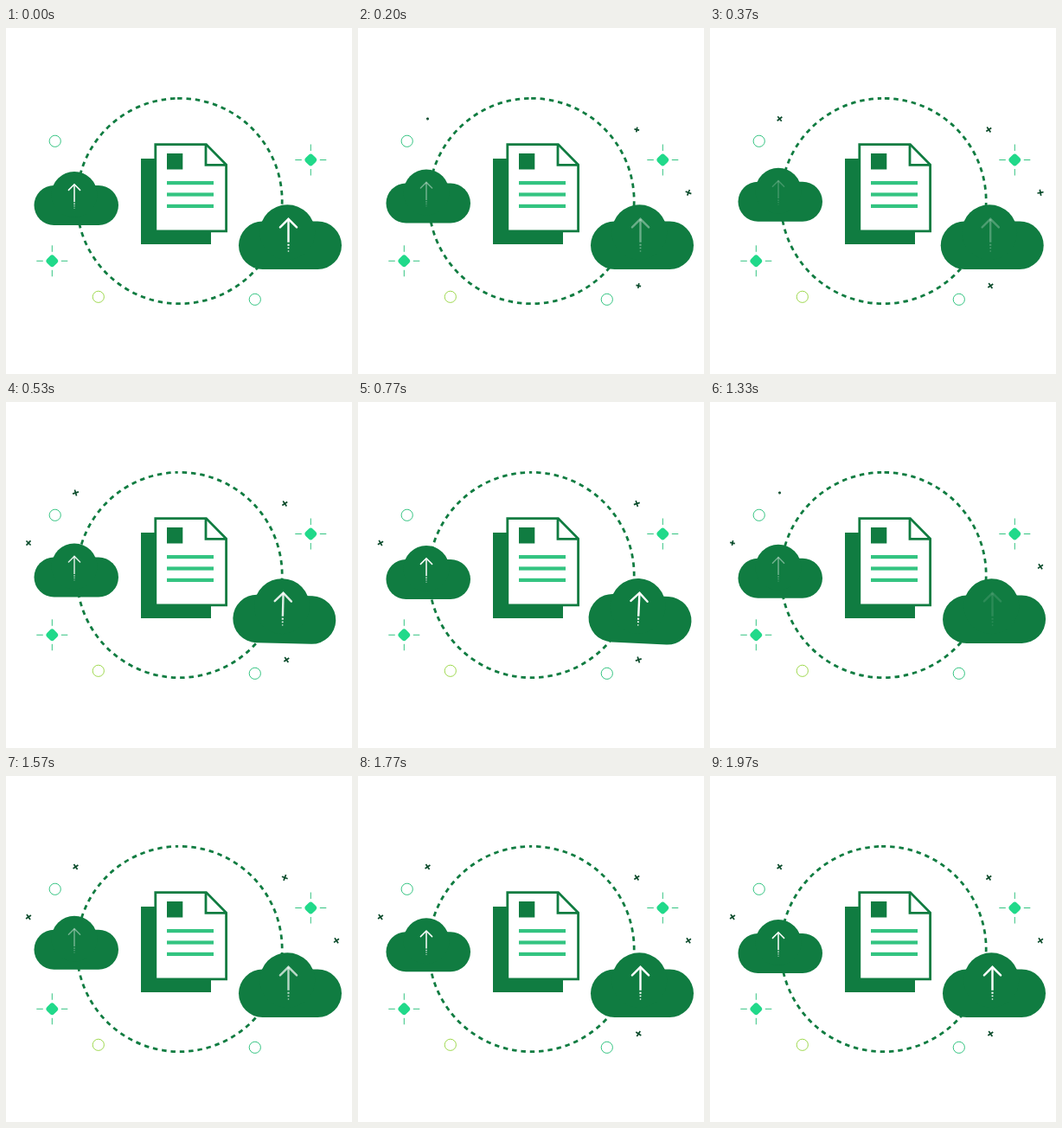
Recreate the animation shown at these times as an HTML page with a canvas. Size 400 px wide and 400 px high, loop 2.01 s.

```html
<!DOCTYPE html>
<html lang="en">
<head>
<meta charset="utf-8">
<title>Cloud upload</title>
<style>
  html, body { margin: 0; width: 100%; height: 100%; overflow: hidden; background: #fff; }
  canvas { display: block; width: 400px; height: 400px; }
</style>
</head>
<body>
<canvas id="stage"></canvas>
<script>
const LOOP = 2010, FRAMES = 60, FPS = 30;
const GREEN = '#107c41', MINT = '#33c481', BRIGHT = '#21d98a', DARK = '#0b4c2c';
const TAU = Math.PI * 2, RAD = Math.PI / 180;

const canvas = document.getElementById('stage');
const ctx = canvas.getContext('2d');
const ratio = window.devicePixelRatio || 1;
canvas.width = canvas.height = 400 * ratio;

const clamp = v => Math.max(0, Math.min(1, v));
const smooth = v => { v = clamp(v); return v * v * (3 - 2 * v); };

// Eased value through [frame, value] keys
function track(keys, f) {
  for (let i = 1; i < keys.length; i++) {
    const [f0, v0] = keys[i - 1], [f1, v1] = keys[i];
    if (f <= f1) return v0 + (v1 - v0) * smooth((f - f0) / (f1 - f0));
  }
  return keys[keys.length - 1][1];
}

// Linear dip from 1 to 0 and back around a middle frame
const dip = (f, mid, half) => clamp(Math.abs(f - mid) / half);

function bump(f, start, length) {
  const p = clamp((f - start) / length);
  return (1 - Math.cos(p * TAU)) / 2;
}

function stroke(color, width, ...lines) {
  ctx.strokeStyle = color;
  ctx.lineWidth = width;
  ctx.beginPath();
  for (const [x, y, ...rest] of lines) {
    ctx.moveTo(x, y);
    for (let i = 0; i < rest.length; i += 2) ctx.lineTo(rest[i], rest[i + 1]);
  }
  ctx.stroke();
}

function box(color, x, y, w, h) {
  ctx.fillStyle = color;
  ctx.fillRect(x, y, w, h);
}

function ring(x, y, color) {
  ctx.strokeStyle = color;
  ctx.lineWidth = 1;
  ctx.beginPath();
  ctx.arc(x, y, 6.6, 0, TAU);
  ctx.stroke();
}

function sparkle(x, y) {
  stroke(MINT, 1,
    [x - 18, y, x - 10.5, y], [x + 10.5, y, x + 18, y],
    [x, y - 18, x, y - 10.5], [x, y + 10.5, x, y + 18]);
  ctx.save();
  ctx.translate(x, y);
  ctx.rotate(45 * RAD);
  ctx.fillStyle = BRIGHT;
  ctx.beginPath();
  ctx.roundRect(-5.8, -5.8, 11.6, 11.6, 3.4);
  ctx.fill();
  ctx.restore();
}

function dashes(f) {
  const count = 72, step = TAU * 119 / count;
  ctx.save();
  ctx.setLineDash([step * 0.53, step * 0.47]);
  ctx.lineDashOffset = -2 * step * f / FRAMES;
  ctx.strokeStyle = GREEN;
  ctx.lineWidth = 2.8;
  ctx.beginPath();
  ctx.arc(200.5, 200, 118.7, -Math.PI / 2 - 0.02, 1.5 * Math.PI - 0.02);
  ctx.stroke();
  ctx.restore();
}

function page() {
  box(GREEN, 156, 151, 81, 99);
  ctx.beginPath();
  ctx.moveTo(172.8, 134.6);
  ctx.lineTo(231.5, 134.6);
  ctx.lineTo(254.6, 158);
  ctx.lineTo(254.6, 234.8);
  ctx.lineTo(172.8, 234.8);
  ctx.closePath();
  ctx.fillStyle = '#fff';
  ctx.fill();
  ctx.strokeStyle = GREEN;
  ctx.lineWidth = 2.8;
  ctx.stroke();
  stroke(GREEN, 2.8, [231, 134.6, 231, 158.4, 254.6, 158.4]);
  box(GREEN, 186, 145, 18.3, 18.5);
  for (const y of [177, 190.4, 203.8]) box(MINT, 186, y, 54, 4.2);
}

function cloud(x, y, w, h, cx, cy, r) {
  ctx.fillStyle = GREEN;
  ctx.beginPath();
  ctx.roundRect(x, y, w, h, h / 2);
  ctx.fill();
  ctx.beginPath();
  ctx.arc(cx, cy, r, 0, TAU);
  ctx.fill();
}

function arrow(x, y, wing, shaft, width, gap, alpha) {
  ctx.save();
  ctx.globalAlpha = alpha;
  ctx.lineCap = 'round';
  stroke('#fff', width, [x - wing, y + wing, x, y, x + wing, y + wing]);
  ctx.lineCap = 'butt';
  stroke('#fff', width, [x, y, x, y + shaft]);
  for (let i = 0; i < 3; i++) {
    const size = width * (0.9 - i * 0.15);
    box('#fff', x - size / 2, y + shaft + gap * (i + 0.5), size, gap * (0.55 - i * 0.1));
  }
  ctx.restore();
}

function leftCloud(f) {
  ctx.save();
  ctx.translate(0, -4.2 * (bump(f, 0, 22) + bump(f, 36, 22)));
  cloud(32.5, 182, 97.5, 46, 79, 192.5, 26.5);
  const alpha = Math.min(dip(f, 9.3, 8), dip(f, 43.5, 8.5));
  arrow(79, 180.8, 6.6, 20.5, 1.5, 2.6, alpha);
  ctx.restore();
}

const SHIFT = [[7, 0], [17.5, -7], [29, 3], [41, 0]];
const TILT = [[11, 0], [21.5, 3], [32, -1.8], [42, 0]];

function rightCloud(f) {
  ctx.save();
  ctx.translate(328.5 + track(SHIFT, f), 248);
  ctx.rotate(track(TILT, f) * RAD);
  ctx.translate(-328.5, -248);
  cloud(269, 223.5, 119, 55.5, 325.3, 236.2, 32);
  const alpha = Math.min(dip(f, 9, 8), dip(f, 41, 8.5));
  arrow(326.5, 220.8, 9.6, 27, 2.4, 3.8, alpha);
  ctx.restore();
}

// Position, then the first and second visible spans
const CROSSES = [
  { x: 80.5, y: 105, spans: [[5, 20], [39, 70]] },
  { x: 322.3, y: 117.5, spans: [[4, 27], [44, 70]] },
  { x: 382, y: 190.3, spans: [[3, 14], [29, 70]] },
  { x: 324.3, y: 298, spans: [[4, 27], [49, 70]] },
  { x: 26, y: 163, spans: [[11, 29], [38, 70]] }
];

function cross({ x, y, spans }, f) {
  const span = spans.find(([from, to]) => f > from && f < to);
  if (!span) return;
  const age = f - span[0], left = span[1] - f;
  const size = 3.6 * clamp(Math.min(age, left) / 2.5);
  const angle = 55 * smooth(age / 7) + 35 * (1 - smooth(left / 8));
  ctx.save();
  ctx.translate(x, y);
  ctx.rotate(angle * RAD);
  stroke(DARK, 1.7, [-size, 0, size, 0], [0, -size, 0, size]);
  ctx.restore();
}

function draw(f) {
  ctx.setTransform(ratio, 0, 0, ratio, 0, 0);
  box('#fff', 0, 0, 400, 400);
  dashes(f);
  page();
  ring(56.7, 130.8, MINT);
  ring(106.8, 310.8, '#9fd94f');
  ring(287.8, 313.8, MINT);
  sparkle(352.3, 152.5);
  sparkle(53.3, 269.3);
  leftCloud(f);
  rightCloud(f);
  for (const c of CROSSES) cross(c, f);
}

function tick() {
  const t = performance.now() % LOOP;
  draw(Math.min(FRAMES - 1, Math.floor(t * FPS / 1000 + 0.15)));
  requestAnimationFrame(tick);
}
tick();
</script>
</body>
</html>
```
